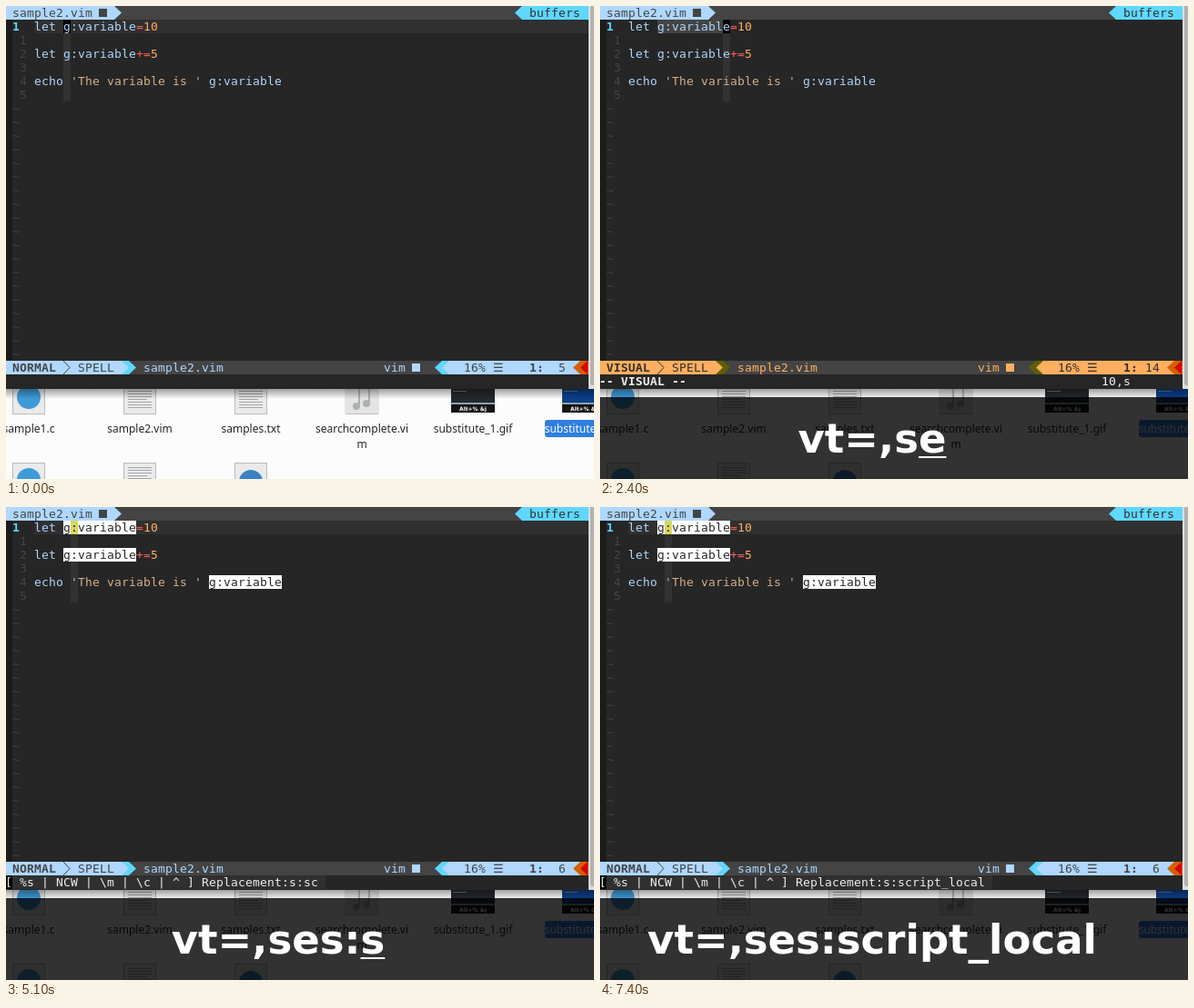
These frames come from a looping animation (646x520 px, 8000 ms). An HTML page with a canvas:

```html
<!DOCTYPE html>
<html lang="en">
<head>
<meta charset="utf-8">
<title>Substitute from a visual selection</title>
<style>
html, body { margin: 0; width: 646px; height: 520px; overflow: hidden; background: #fcfcfc; }
canvas { display: block; }
</style>
</head>
<body>
<canvas id="stage" width="646" height="520"></canvas>
<script>
const ctx = document.getElementById('stage').getContext('2d');
const LOOP = 8000, CELL = 8, ROW = 15;
const MONO = '"DejaVu Sans Mono", "DejaVu Sans", monospace';
const KEYS = 'vt=,ses:script_local';
const BG = '#262626', LINE = '#303030', GREY = '#444444', BLUE = '#afd7ff',
      CYAN = '#5fd7ff', ORANGE = '#ffaf5f', RED = '#ff5f5f', SAND = '#d7af87';

// [time, keys shown, keys underlined, keys the editor has handled]
const STEPS = [
  [0, 0, 0, 0], [400, 1, 1, 1], [600, 1, 1, 2], [700, 2, 1, 2], [900, 2, 0, 2],
  [1100, 2, 0, 3], [1200, 3, 1, 3], [1400, 3, 0, 3],
  [2000, 3, 0, 4], [2100, 4, 1, 4], [2200, 4, 1, 5], [2300, 5, 1, 5], [2400, 6, 1, 5],
  [3000, 6, 0, 6], [4400, 7, 1, 7],
  [4600, 7, 1, 8], [4700, 8, 1, 8], [4800, 8, 1, 9], [4900, 9, 1, 9],
  [5100, 9, 1, 10], [5200, 10, 1, 11], [5300, 11, 1, 11],
  [5600, 13, 2, 13], [5700, 14, 1, 14], [5900, 14, 0, 14],
  [6100, 15, 1, 15], [6200, 15, 1, 16], [6300, 16, 1, 16], [6500, 16, 0, 16],
  [6800, 16, 0, 17], [6900, 17, 1, 18], [7000, 18, 1, 19], [7100, 19, 1, 20],
  [7200, 20, 1, 20], [7400, 20, 0, 20]
];

function rect(x, y, w, h, color) {
  ctx.fillStyle = color;
  ctx.fillRect(x, y, w, h);
}

function circle(x, y, r, color) {
  ctx.fillStyle = color;
  ctx.beginPath();
  ctx.arc(x, y, r, 0, 7);
  ctx.fill();
}

const colX = col => col * CELL - 1;

function cells(col, row, count, color, rows = 1) {
  rect(colX(col), row * ROW, count * CELL, rows * ROW, color);
}

function text(col, row, str, color, bold) {
  ctx.font = (bold ? 'bold ' : '') + '13px ' + MONO;
  ctx.textAlign = 'left';
  ctx.fillStyle = color;
  [...str].forEach((ch, i) => ctx.fillText(ch, colX(col + i), row * ROW + 12));
}

// Solid separator one cell wide, pointing right (1) or left (-1)
function arrow(col, row, dir, color) {
  const x = colX(col), y = row * ROW, base = dir > 0 ? x : x + CELL;
  ctx.fillStyle = color;
  ctx.beginPath();
  ctx.moveTo(base, y);
  ctx.lineTo(base + dir * CELL, y + ROW / 2);
  ctx.lineTo(base, y + ROW);
  ctx.fill();
}

function label(x, y, str, color = '#232629') {
  ctx.font = '12px "Noto Sans", sans-serif';
  ctx.textAlign = 'center';
  ctx.fillStyle = color;
  ctx.fillText(str, x, y);
}

function page(x, bottom, lines) {
  rect(x - 18, bottom - 46, 36, 46, '#b9bbbc');
  rect(x - 17, bottom - 45, 34, 44, '#e9eaea');
  if (lines) {
    for (let y = bottom - 41; y < bottom - 6; y += 3) {
      rect(x - 13, y, y % 4 ? 26 : 21, 1, '#a5a7a8');
    }
  }
}

function thumbnail(x, top) {
  rect(x, 400, 48, 47, top);
  rect(x + 2, 423, 15, 1, '#65727c');
  rect(x, 436, 48, 2, '#8ba3b5');
  rect(x, 438, 48, 9, '#151515');
  ctx.font = 'bold 6px "DejaVu Sans", sans-serif';
  ctx.textAlign = 'center';
  ctx.fillStyle = '#fff';
  ctx.fillText('Alt+% &j', x + 24, 445);
}

function desktop() {
  rect(0, 420, 646, 100, '#fcfcfc');
  page(25, 449);
  circle(25, 430, 13, '#3f9bd8');
  page(147, 449, true);
  page(269, 449, true);
  page(391, 449);
  rect(372, 404, 38, 44, '#e3e4e4');
  circle(385, 440, 4, '#aeb0b1');
  circle(396, 437, 4, '#aeb0b1');
  rect(387, 420, 2, 20, '#aeb0b1');
  rect(398, 420, 2, 17, '#aeb0b1');
  thumbnail(489, '#25282b');
  thumbnail(611, '#0b3f88');

  label(25, 469, 'sample1.c');
  label(147, 469, 'sample2.vim');
  label(269, 469, 'samples.txt');
  label(391, 469, 'searchcomplete.vi');
  label(391, 486, 'm');
  label(513, 469, 'substitute_1.gif');
  ctx.fillStyle = '#2e7fe0';
  ctx.beginPath();
  ctx.roundRect(592, 455, 90, 19, 3);
  ctx.fill();
  label(635, 469, 'substitute_2.gif', '#fff');

  page(25, 548);
  circle(25, 521, 13, '#3f9bd8');
  page(147, 548, true);
  page(269, 548);
  circle(269, 523, 13, '#3b82c4');

  const shadow = ctx.createLinearGradient(0, 420, 0, 432);
  shadow.addColorStop(0, 'rgba(0,0,0,.4)');
  shadow.addColorStop(1, 'rgba(0,0,0,0)');
  ctx.fillStyle = shadow;
  ctx.fillRect(0, 420, 646, 12);
}

function buffer(handled, visual, prompt) {
  const cursor = prompt ? 9 : handled >= 3 ? 17 : 8;
  rect(0, 0, 640, 421, BG);
  rect(0, ROW, 7, 25 * ROW, '#1c1c1c');
  if (!visual) rect(31, ROW, 609, ROW, LINE);
  cells(cursor, 2, 1, '#323232', 5);

  text(1, 1, '1', CYAN, true);
  for (let n = 1; n <= 5; n++) text(2, n + 1, String(n), GREY);
  for (let row = 7; row < 26; row++) text(1, row, '~', GREY);

  if (visual) cells(8, 1, cursor - 8, GREY);
  if (prompt) {
    cells(8, 1, 10, '#fff');
    cells(8, 3, 10, '#fff');
    cells(28, 5, 10, '#fff');
  }
  cells(cursor, 1, 1, prompt ? '#d7d75f' : '#000');

  const name = prompt ? BG : BLUE;
  text(4, 1, 'let', BLUE);
  text(8, 1, 'g:variable', name);
  text(18, 1, '=', RED);
  text(19, 1, '10', ORANGE);
  text(4, 3, 'let', BLUE);
  text(8, 3, 'g:variable', name);
  text(18, 3, '+=', RED);
  text(20, 3, '5', ORANGE);
  text(4, 5, 'echo', BLUE);
  text(9, 5, "'The variable is '", SAND);
  text(28, 5, 'g:variable', name);
}

function tabline() {
  rect(0, 0, 640, ROW, GREY);
  rect(0, 0, 119, ROW, BLUE);
  arrow(15, 0, 1, BLUE);
  text(1, 0, 'sample2.vim', GREY);
  rect(102, 3, 9, 9, GREY);
  arrow(70, 0, -1, CYAN);
  rect(567, 0, 73, ROW, CYAN);
  text(72, 0, 'buffers', LINE);
}

function statusline(visual, column) {
  const main = visual ? ORANGE : BLUE, edge = visual ? '#5f5f00' : CYAN;
  const ink = visual ? LINE : GREY, y = 26 * ROW;
  rect(0, y, 640, ROW, GREY);
  rect(0, y, 127, ROW, main);
  cells(16, 26, 1, edge);
  arrow(16, 26, 1, main);
  arrow(17, 26, 1, edge);
  text(1, 26, visual ? 'VISUAL' : 'NORMAL', ink, true);
  ctx.strokeStyle = ink;
  ctx.lineWidth = 1;
  ctx.beginPath();
  ctx.moveTo(63, y);
  ctx.lineTo(70, y + 7.5);
  ctx.lineTo(63, y + 15);
  ctx.stroke();
  text(10, 26, 'SPELL', ink);
  text(19, 26, 'sample2.vim', main);
  text(52, 26, 'vim', main);
  rect(446, y + 3, 9, 9, main);

  arrow(59, 26, -1, edge);
  cells(60, 26, 1, edge);
  arrow(60, 26, -1, main);
  cells(61, 26, 18, main);
  text(63, 26, '16% ☰', ink);
  text(72, 26, '1:', ink, true);
  text(74, 26, String(column).padStart(3), ink);
  arrow(78, 26, -1, '#d75f00');
  rect(631, y, 9, ROW, '#d75f00');
  arrow(79, 26, -1, '#d70000');
}

function commandLine(handled, visual, prompt) {
  if (visual) {
    text(0, 27, '-- VISUAL --', '#eeeeee', true);
    text(69, 27, ['1', 't', '10', '10,', '10,s'][handled - 1], '#eeeeee');
  } else if (prompt) {
    const line = '[ %s | NCW | \\m | \\c | ^ ] Replacement:' + KEYS.slice(6, handled);
    cells(0, 27, line.length + 1, LINE);
    cells(0, 27, 1, '#000');
    text(0, 27, line, '#eeeeee');
  }
}

function scrollbar() {
  rect(640, 0, 6, 421, '#dddddd');
  ctx.fillStyle = '#b2b2b2';
  ctx.beginPath();
  ctx.roundRect(642, -6, 6, 423, 3);
  ctx.fill();
}

function keyOverlay(shown, fresh) {
  if (!shown) return;
  rect(0, 430, 646, 90, 'rgba(0,0,0,.8)');
  ctx.font = 'bold 45px "DejaVu Sans", sans-serif';
  ctx.textAlign = 'left';
  const str = KEYS.slice(0, shown), width = ctx.measureText(str).width;
  const x = 299 - width / 2;
  ctx.fillStyle = '#fff';
  ctx.fillText(str, x, 491);
  if (fresh) {
    const start = ctx.measureText(str.slice(0, -fresh)).width;
    ctx.fillRect(x + start, 495, width - start, 2);
  }
}

function draw(now) {
  const t = now % LOOP;
  const [, shown, fresh, handled] = STEPS.findLast(step => step[0] <= t);
  const visual = handled > 0 && handled < 6, prompt = handled >= 6;
  desktop();
  buffer(handled, visual, prompt);
  tabline();
  statusline(visual, prompt ? 6 : handled >= 3 ? 14 : 5);
  commandLine(handled, visual, prompt);
  scrollbar();
  keyOverlay(shown, fresh);
}

const begin = performance.now();
function tick() {
  draw(performance.now() - begin);
  requestAnimationFrame(tick);
}
tick();
</script>
</body>
</html>
```
